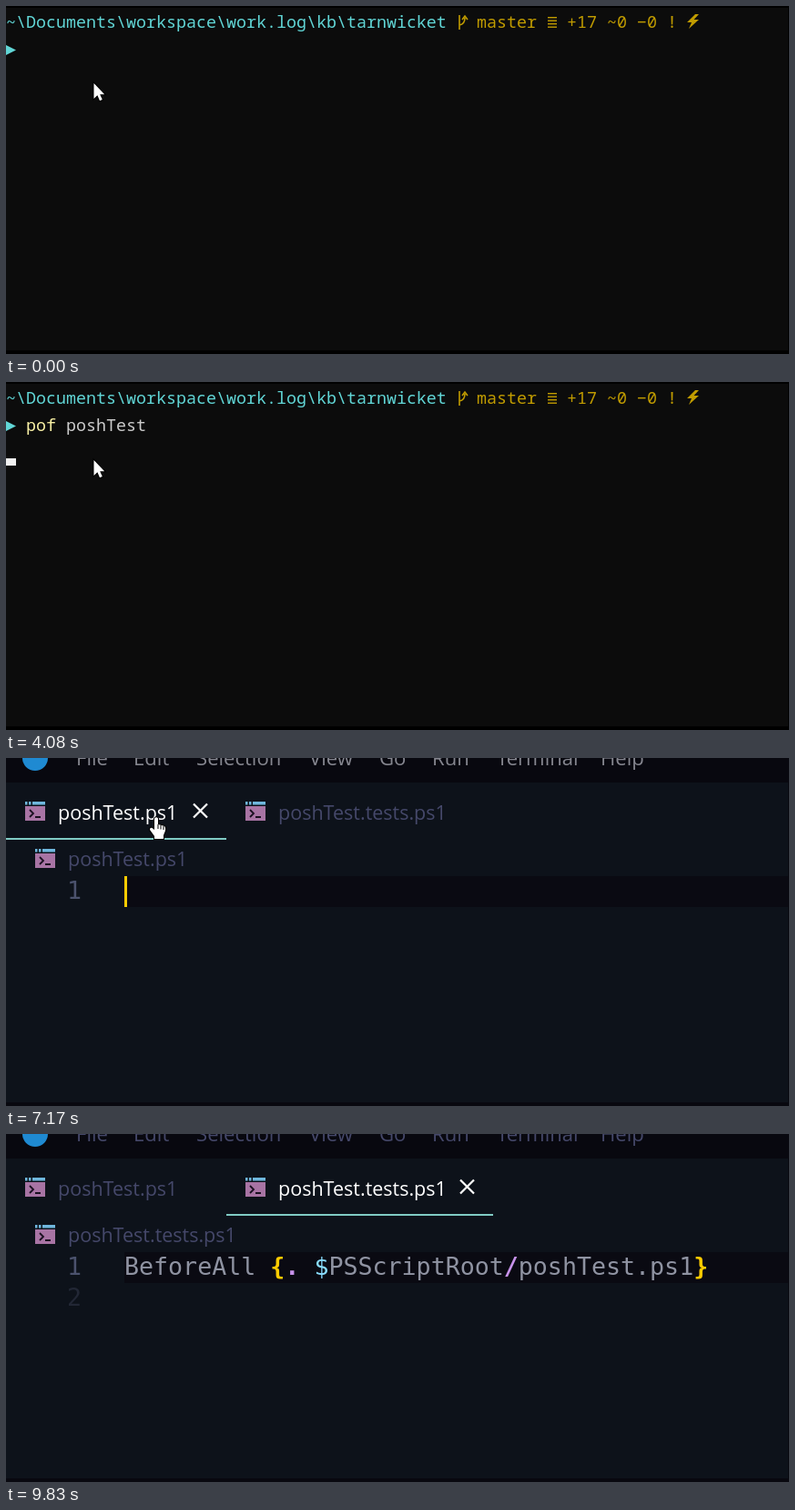
An HTML page with a canvas that plays this animation: 860 by 383 pixels, repeating every 9910 ms.

```html
<!DOCTYPE html>
<html lang="en">
<head>
<meta charset="utf-8">
<title>Terminal to editor</title>
<style>
  html, body { margin: 0; width: 100%; height: 100%; overflow: hidden; background: #0c0c0c; }
  canvas { display: block; }
</style>
</head>
<body>
<canvas id="stage" width="860" height="383"></canvas>
<script>
const g = document.getElementById('stage').getContext('2d');
const LOOP = 9910, TICK = 1000 / 12;           // all times below are in ticks
const TERM = '18.333px "Noto Sans Mono", monospace';
const CODE = '26.63px "DejaVu Sans Mono", monospace';
const MENU = '22.1px "Open Sans", sans-serif';
const TAB = '21.5px "Open Sans", sans-serif';
const CYAN = '#61d6d6', AMBER = '#c19c00', GREY = '#cccccc';
const BACK = '#0d121a', DARK = '#08080f', DIM = '#45486a', CODE_GREY = '#8f93a2';
const GOLD = '#ffcc00', AQUA = '#89ddff', VIOLET = '#c792ea';
const PATH = '\\Documents\\workspace\\work.log\\kb\\tarnwicket';

function rect(x, y, w, h, color) {
  g.fillStyle = color;
  g.fillRect(x, y, w, h);
}
function text(s, x, y, color, font) {
  g.font = font;
  g.fillStyle = color;
  g.fillText(s, x, y);
}
function shape(d, x, y, fill, stroke, width = 1) {
  const p = new Path2D(d);
  g.save();
  g.translate(x, y);
  g.lineWidth = width;
  if (stroke) { g.strokeStyle = stroke; g.stroke(p); }
  if (fill) { g.fillStyle = fill; g.fill(p); }
  g.restore();
}
function disc(x, y, r, color) {
  g.fillStyle = color;
  g.beginPath();
  g.arc(x, y, r, 0, 7);
  g.fill();
}
const within = (k, spans) => spans.some(([a, b]) => k >= a && k < b);

// ---- Terminal ----
const COMMAND = 'pof poshTest';
const KEYS = [15, 17, 18, 24, 28, 29, 30, 33, 35, 36, 38, 39];
const CURSOR_ON = [[7, 14], [16, 20], [24, 26], [28, 32], [33, 39], [45, 50], [51, 55]];
const LISTING = [
  [4, '    Directory: C:\\Users\\maren' + PATH],
  [6, 'Mode                 LastWriteTime         Length Name'],
  [7, '----                 -------------         ------ ----'],
  [8, '-a---          10/02/2021  9:41 PM              0 poshTest.ps1'],
  [9, '-a---          10/02/2021  9:41 PM             42 poshTest.tests.ps1']
];
const cell = (s, col, row, color) => text(s, col * 11, row * 30 - 6, color, TERM);

function terminal(k) {
  rect(0, 0, 860, 383, '#0c0c0c');
  rect(0, 0, 860, 2, '#000');
  rect(0, 379, 860, 4, '#000');
  cell('~' + PATH, 0, 1, CYAN);
  shape('M3 1V17M3 12Q9 11 9 4M6 6L9 2L12 6', 495, 9, null, AMBER, 1.6);
  cell('master', 47, 1, AMBER);
  for (let i = 0; i < 4; i++) rect(595, 12 + i * 3.5, 10, 1.4, AMBER);
  cell('+17', 56, 1, AMBER);
  cell('~0', 60, 1, AMBER);
  cell('\u22120', 63, 1, AMBER);
  cell('!', 66, 1, AMBER);
  shape('M9 0L0 9H5L2 16L13 6H7.5L13 0Z', 748, 9, AMBER);
  shape('M0 0L11 5.5L0 11Z', 0, 43, CYAN);

  const n = KEYS.filter(t => k >= t).length;
  cell(COMMAND.slice(0, Math.min(n, 3)), 2, 2, '#f9f1a5');
  cell(COMMAND.slice(4, Math.max(n, 4)), 6, 2, GREY);
  for (const [row, line] of LISTING)
    if (k >= (row < 9 ? 50 : 51)) cell(line, 0, row, GREY);

  if (within(k, CURSOR_ON)) {
    const row = k < 49 ? 2 : k < 51 ? 3 : 10;
    rect(row === 2 ? (2 + n) * 11 : 0, row * 30 - 6, 11, 8, '#f2f2f2');
  }
}

// ---- Editor ----
const ITEMS = [['File', 77], ['Edit', 140], ['Selection', 209], ['View', 333],
  ['Go', 410], ['Run', 468], ['Terminal', 539], ['Help', 653]];

function fileIcon(x, y) {
  const blue = '#6fb7dd';
  rect(x, y, 2.5, 3.5, blue);
  rect(x + 4, y, 2.5, 3.5, blue);
  rect(x + 8, y, 14, 3.5, blue);
  rect(x, y + 5, 22, 16, '#a874a4');
  shape('M5 9L9 13L5 17M11 17H17', x, y, null, '#1a1020', 1.8);
}
function tab(x, width, name, active, hover) {
  fileIcon(x + 21, 48);
  text(name, x + 57, 68, active ? '#fff' : DIM, TAB);
  if (active || hover)
    shape('M0 0L15 15M15 0L0 15', x + width - 36, 50.5, null, active ? '#fff' : DIM, 2.2);
  if (active) rect(x, 88, width, 2, '#80cbc4');
}
function codeLine(k) {
  const brace = within(k, [[74, 86], [98, 119]]) ? GOLD : AQUA;
  const parts = [[0, 'BeforeAll', CODE_GREY], [10, '{', brace], [11, '.', VIOLET],
    [13, '$', AQUA], [14, 'PSScriptRoot', CODE_GREY], [26, '/', VIOLET],
    [27, 'poshTest.ps1', CODE_GREY], [39, '}', brace]];
  for (const [col, s, color] of parts) {
    const weight = '{./}'.includes(s) ? 'bold ' : '';
    text(s, 130 + col * 16.03, 155, k < 71 ? CODE_GREY : color, weight + CODE);
  }
}
function caretOn(k) {
  const start = k >= 92 ? 92 : k >= 86 ? 86 : 71;
  return k >= 71 && k < 118 && Math.floor((k - start) / 6.2) % 2 === 0;
}
function editor(k, mouse) {
  rect(0, 0, 860, 383, BACK);
  rect(0, 0, 860, 27, DARK);
  disc(32, 0, 14, '#1f8ad2');
  const menuColor = within(k, [[57, 118]]) ? '#85868f' : DIM;
  for (const [s, x] of ITEMS) text(s, x, 8, menuColor, MENU);

  if (k < 68) {
    disc(850, 319, 114, '#0a0a12');
  } else {
    const both = k >= 70, tests = both && !within(k, [[86, 92]]);
    const overTabs = mouse && mouse.y < 86 && k >= 74;
    const overCrumb = mouse && mouse.y >= 86 && mouse.y < 125 && mouse.x < 255 && k >= 74;
    tab(0, 242, 'poshTest.ps1', !tests, overTabs && mouse.x < 242);
    if (both) tab(242, 293, 'poshTest.tests.ps1', tests, overTabs && mouse.x >= 242);
    fileIcon(32, 100);
    text(tests ? 'poshTest.tests.ps1' : 'poshTest.ps1', 68, 119, overCrumb ? CODE_GREY : DIM, TAB);
    rect(130, 130, 730, 34, '#0a0a12');
    text('1', 67, 155, '#4b526d', CODE);
    if (tests) {
      text('2', 67, 189, '#222735', CODE);
      codeLine(k);
    }
    if (caretOn(k)) rect(130, 130, 3, 34, GOLD);
  }
  rect(0, 379, 860, 4, DARK);
}

// ---- Mouse ----
const TRACK = [[0, 96, 84], [1, 96, 84], [2, 96, 85], [73, 96, 85], [75, 199, 88], [78, 206, 66],
  [79, 206, 66], [82, 308, 64], [84, 165, 65], [88, 165, 65], [90, 300, 64], [92, 298, 66],
  [95, 272, 162], [101, 420, 154], [102, 420, 154], [105, 613, 161], [107, 613, 161], [112, 685, 359]];

function mouseAt(k) {
  const i = TRACK.findIndex(p => p[0] >= k);
  if (i < 0) return null;
  const [t1, x1, y1] = TRACK[i], [t0, x0, y0] = TRACK[Math.max(i - 1, 0)];
  const u = t1 > t0 ? (k - t0) / (t1 - t0) : 1;
  return { x: Math.round(x0 + (x1 - x0) * u), y: Math.round(y0 + (y1 - y0) * u) };
}
function pointer(k, { x, y }) {
  if (k < 74) {
    shape('M.5 1V18L4.4 14.3L7 20.3L9.8 19.1L7.2 13.2H12.2Z', x, y, '#fff', '#000', 2);
    if (within(k, [[53, 55]])) {
      g.strokeStyle = '#3aa0e8';
      g.lineWidth = 3;
      g.beginPath();
      g.arc(x + 22, y + 13, 7.5, 0, 7);
      g.stroke();
    }
  } else if (y < 125) {
    shape('M-2 1.5Q0-1 2 1.5V8L9 10Q10.5 11 10 15L8 20V24H-2V21L-7 14Q-7 11-4.5 12L-2 14Z',
      x, y, '#fff', '#000', 2);
    shape('M2 8V13M5 9V13.5M8 10V14', x, y, null, '#000', 1);
  } else {
    const beam = 'M-5-9H-1.5L0-8L1.5-9H5M0-8V8M-5 9H-1.5L0 8L1.5 9H5';
    shape(beam, x + .5, y, null, '#000', 4);
    shape(beam, x + .5, y, null, '#fff', 1.8);
  }
}

function frame(now) {
  const k = Math.min(118, Math.floor((now % LOOP + 5) / TICK));
  const mouse = mouseAt(k);
  if (k < 55) terminal(k); else editor(k, mouse);
  rect(859, 0, 1, 383, k < 55 ? '#000' : DARK);
  if (mouse) pointer(k, mouse);
  requestAnimationFrame(() => frame(performance.now() - begin));
}
const begin = performance.now();
frame(0);
</script>
</body>
</html>
```
